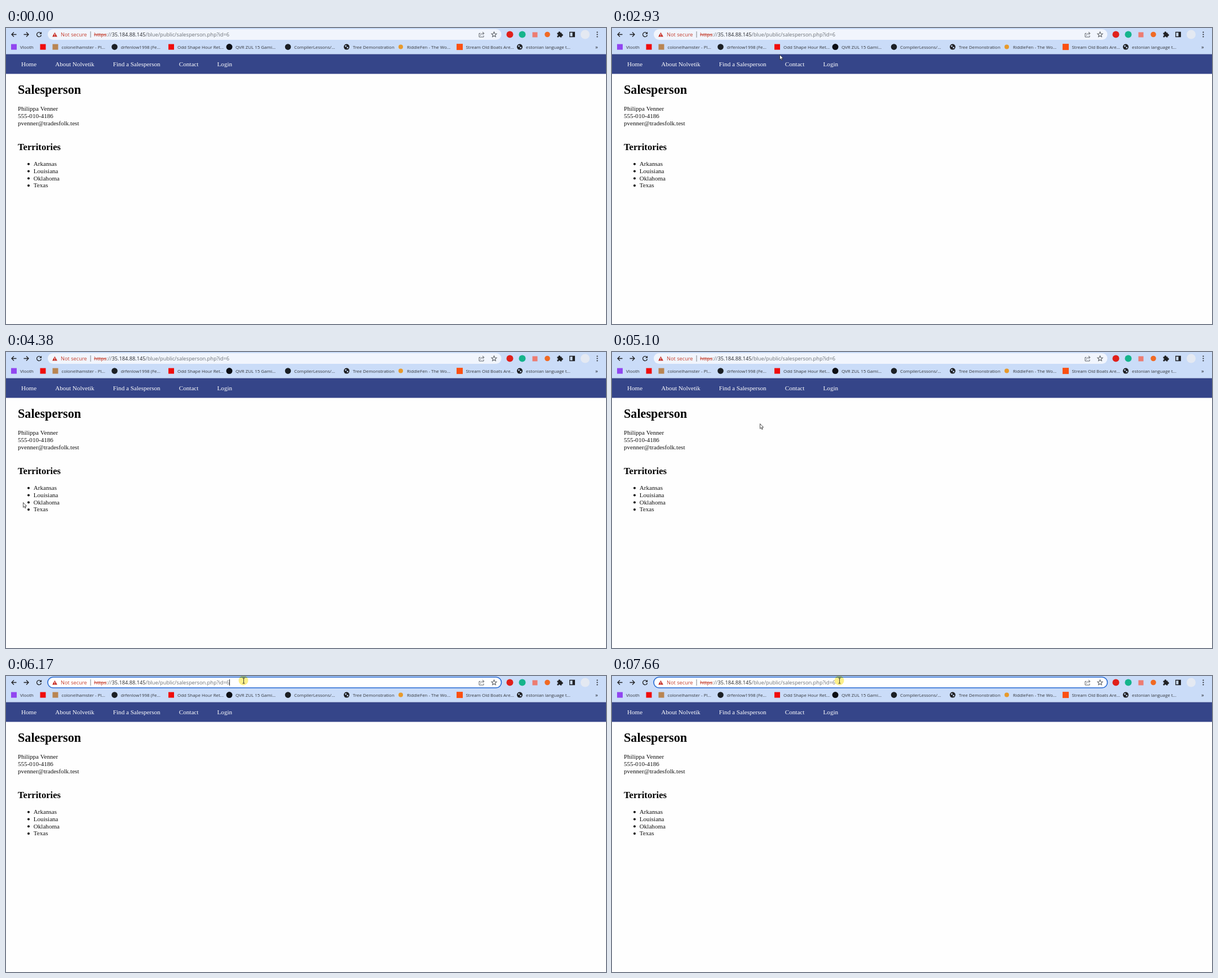
Write an HTML page with a canvas that moves like this. It is 1064 px wide and 526 px high and loops after 7990 ms.

```html
<!DOCTYPE html>
<html lang="en">
<head>
<meta charset="utf-8">
<title>Salesperson</title>
<style>
html, body { margin: 0; width: 100%; height: 100%; overflow: hidden; background: #fefefe; }
canvas { display: block; }
</style>
</head>
<body>
<canvas id="stage" width="1064" height="526"></canvas>
<script>
const ctx = document.getElementById('stage').getContext('2d');
const LOOP = 7990, FOCUS_AT = 6120;
const UI = '"Open Sans", "Noto Sans", sans-serif';
const SERIF = '"Liberation Serif", "Times New Roman", serif';
const INK = '#202124', BAR = '#cadcf8', RED = '#c5402f', GREY = '#6b7075';

// Each move runs on from the last point through evenly timed stops.
const moves = [];
let last = [1115, 656];
function move(start, end, steps, ...stops) {
  moves.push({ start, end, steps, path: [last, ...stops] });
  last = stops[stops.length - 1];
}
move(320, 450, 3, [470, 239]);
move(770, 970, 4, [346, 185]);
move(1230, 1910, 10, [262, 150], [170, 115], [143, 96], [206, 80], [670, -74]);
move(1980, 1990, 1, [421, -16]);
move(2040, 2310, 5, [287, 64]);
move(2530, 2930, 7, [396, 6], [392, 6], [297, 47]);
move(2990, 3320, 6, [150, 150], [50, 258]);
move(3390, 4180, 13, [130, 203], [229, 240], [150, 305], [24, 285], [31, 268]);
move(4380, 4510, 3, [30, 267], [33, 268], [34, 268]);
move(4710, 5100, 7, [165, 182], [262, 127]);
move(5300, 5440, 3, [413, 0]);
move(5640, 5960, 6, [421, 8]);
move(6580, 6660, 2, [420, 8]);
move(6990, 7660, 10, [403, 8]);

function pointerAt(t) {
  const current = moves.filter(m => m.start <= t).pop();
  if (!current) return null;
  const { start, end, steps, path } = current;
  const step = 1 + Math.min(steps - 1, Math.floor((t - start) / (end - start) * (steps - 1)));
  const pos = step / steps * (path.length - 1);
  const i = Math.min(path.length - 2, Math.floor(pos));
  const [x, y] = path[i].map((v, k) => v + (path[i + 1][k] - v) * (pos - i));
  return { x, y };
}

function text(str, x, y, size, color, family = SERIF, weight = 400) {
  ctx.font = `${weight} ${size}px ${family}`;
  ctx.fillStyle = color;
  ctx.fillText(str, x, y);
  return x + ctx.measureText(str).width;
}

function rect(x, y, w, h, color) {
  ctx.fillStyle = color;
  ctx.fillRect(x, y, w, h);
}

function disc(x, y, r, color) {
  ctx.fillStyle = color;
  ctx.beginPath();
  ctx.arc(x, y, r, 0, 7);
  ctx.fill();
}

function square(x, y, r, color) {
  rect(x - r, y - r, 2 * r, 2 * r, color);
}

function shape(d, x, y, stroke, fill, width = 1.3) {
  const p = new Path2D(d);
  ctx.save();
  ctx.translate(x, y);
  if (fill) { ctx.fillStyle = fill; ctx.fill(p); }
  if (stroke) { ctx.strokeStyle = stroke; ctx.lineWidth = width; ctx.stroke(p); }
  ctx.restore();
}

function globe(x, y, r, color) {
  disc(x, y, r, color);
  disc(x - 1.5, y - 1.5, 1.4, BAR);
  disc(x + 1.7, y + 1.3, 1.3, BAR);
}

function star(x, y, r) {
  ctx.beginPath();
  for (let i = 0; i < 10; i++) {
    const a = (i / 5 - 0.5) * Math.PI, d = i % 2 ? r * 0.45 : r;
    ctx.lineTo(x + d * Math.cos(a), y + d * Math.sin(a));
  }
  ctx.closePath();
  ctx.strokeStyle = '#5f6368';
  ctx.lineWidth = 1.1;
  ctx.stroke();
}

function addressBar(focused, caret) {
  ctx.beginPath();
  ctx.roundRect(74, 2, 804.5, 19, 9.5);
  ctx.fillStyle = focused ? '#fff' : '#f1f5fd';
  ctx.fill();
  if (focused) {
    ctx.strokeStyle = '#2468d2';
    ctx.lineWidth = 1.6;
    ctx.stroke();
  }
  shape('M0-4L4.4 3.6H-4.4Z', 86.5, 11.8, null, '#c5281f');
  rect(86, 10.3, 1, 2.6, '#fff');
  rect(86, 13.5, 1, 1, '#fff');
  const label = (str, x, color) => text(str, x, 15, 9.22, color, UI);
  label('Not secure', 97, RED);
  rect(149.5, 6, 1, 11, '#80868b');

  let x = label('https', 156, RED);
  rect(156, 11.5, x - 156, 1, RED);
  x = label('://', x, GREY);
  x = label('35.184.88.145', x, '#2b2d31');
  label('/blue/public/salesperson.php?id=6', x, GREY);
  if (caret) rect(396, 6, 1, 11, INK);

  shape('M-2-2H-4.5V4.5H3.5V2M-2 2Q-2-2 4-2M1.5-4.5L4.4-2L1.5 1', 843.5, 11.5, '#5f6368', null, 1);
  star(865.5, 11.8, 4.8);
}

function toolbar(focused, caret) {
  rect(0, 0, 1064, 46.5, BAR);
  shape('M4.5 0H-4M0-4L-4 0L0 4', 14, 11.5, INK);
  shape('M-4.5 0H4M0-4L4 0L0 4', 36, 11.5, INK);
  shape('M3.3-2.3A4 4 0 1 0 4 1', 58.5, 11.5, INK);
  shape('M4.6-4.8V-.8H.6Z', 58.5, 11.5, null, INK);
  addressBar(focused, caret);

  disc(893.5, 11.5, 6, '#e0201c');
  disc(915.5, 11.5, 6, '#15b48c');
  square(938, 12, 4.5, '#ec7c72');
  disc(960, 11.5, 4.8, '#f06a24');
  square(981.5, 12.5, 4, INK);
  disc(981.3, 8.2, 1.9, INK);
  disc(985.8, 12.5, 1.9, INK);
  disc(977.8, 12.5, 1.3, BAR);
  disc(981.3, 16.4, 1.3, BAR);
  shape('M-4.3-4H4.3V4H-4.3Z', 1004, 11.5, INK);
  rect(1004.5, 7.5, 4, 8, INK);
  disc(1027, 11.5, 8, '#e4e9f2');
  for (let i = 0; i < 3; i++) disc(1048.5, 7.5 + 4 * i, 1.1, INK);
}

function bookmark(x, label, icon, r, color) {
  icon(x - 11, 33.6, r, color);
  text(label, x, 36.5, 7.93, '#33363b', UI);
}

function bookmarks() {
  bookmark(25, 'Vlooth', square, 5, '#9146f0');
  bookmark(76.5, '', square, 5, '#f00c0c');
  bookmark(98.5, 'colonelhamster - Pl...', square, 5, '#b98552');
  bookmark(203.5, 'drfenlow1998 (Fe...', disc, 5.3, '#1b1f24');
  bookmark(304, 'Odd Shape Hour Ret...', square, 5, '#f00c0c');
  bookmark(407, 'QVR ZUL 15 Gami...', disc, 5.5, '#0c0e14');
  bookmark(511, 'CompilerLessons/...', disc, 5.3, '#1b1f24');
  bookmark(615, 'Tree Demonstration', globe, 5, INK);
  bookmark(711, 'RiddleFen - The Wo...', disc, 4, '#e79a2c');
  bookmark(815.5, 'Stream Old Boats Are...', square, 5.5, '#fb5012');
  bookmark(922, 'estonian language t...', globe, 5, INK);
  text('»', 1045, 36.5, 9.5, INK, UI);
}

function page() {
  rect(0, 46.5, 1064, 35, '#354589');
  let x = 27;
  for (const link of ['Home', 'About Nolvetik', 'Find a Salesperson', 'Contact', 'Login']) {
    x = text(link, x, 68, 11.1, '#fff') + 33.2;
  }
  text('Salesperson', 21, 117, 22.2, '#000', SERIF, 700);
  ['Philippa Venner', '555-010-4186', 'pvenner@tradesfolk.test']
    .forEach((line, i) => text(line, 21, 147.2 + i * 12.75, 11.1, '#111'));
  text('Territories', 21, 217, 16.65, '#000', SERIF, 700);
  ['Arkansas', 'Louisiana', 'Oklahoma', 'Texas'].forEach((state, i) => {
    const y = 245 + i * 12.75;
    disc(40, y - 3.2, 2, '#000');
    text(state, 48.8, y, 11.1, '#111');
  });
}

function pointer({ x, y }, pressed) {
  if (pressed) {
    ctx.globalCompositeOperation = 'multiply';
    disc(x, y, 8.5, '#fcf08a');
    ctx.globalCompositeOperation = 'source-over';
  }
  if (y >= 2 && y <= 20) {
    shape('M-2-4.5H2M0-4.5V4.5M-2 4.5H2', Math.round(x) + 0.5, y + 0.5, '#3c3c30', null, 1);
  } else {
    shape('M.5.5V9.2L2.5 7.4L3.9 10.6L5.2 10L3.8 6.9H6.6Z', x, y, '#222', '#fff', 0.8);
  }
}

function draw(t) {
  const focused = t >= FOCUS_AT;
  const caret = focused && (t - FOCUS_AT) % 1000 < 500;
  rect(0, 0, 1064, 526, '#fefefe');
  toolbar(focused, caret);
  bookmarks();
  page();
  const p = pointerAt(t);
  if (p) pointer(p, focused);
}

const began = performance.now();
function tick() {
  draw((performance.now() - began) % LOOP);
  requestAnimationFrame(tick);
}
tick();
</script>
</body>
</html>
```
